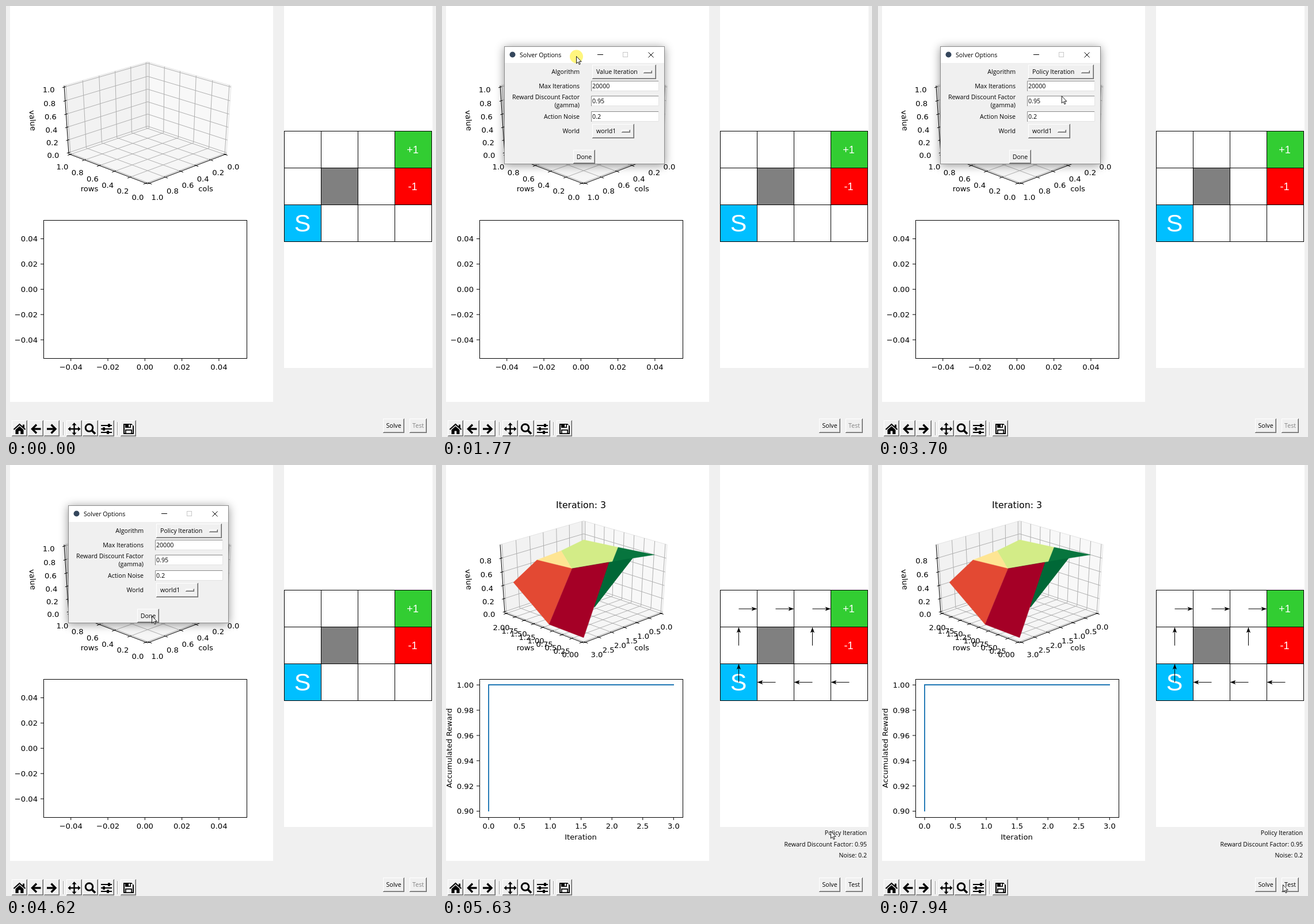
Animation of 747 by 749 pixels, one loop 8000 ms. Source, as an HTML page with a canvas:

```html
<!DOCTYPE html>
<html lang="en">
<head>
<meta charset="utf-8">
<title>Grid world solver</title>
<style>
html, body { margin: 0; width: 100%; height: 100%; overflow: hidden; background: #f0f0f0; }
canvas { display: block; }
</style>
</head>
<body>
<canvas id="stage" width="747" height="749"></canvas>
<script>
const g = document.getElementById('stage').getContext('2d');
const LOOP = 8000;
const PLOT = '"DejaVu Sans", sans-serif', UI = '"Open Sans", sans-serif', CELL = '"Liberation Sans", sans-serif';

// ---------- helpers ----------
function rect(x, y, w, h, fill) { g.fillStyle = fill; g.fillRect(x, y, w, h); }
function frame(x, y, w, h, color) {
  g.strokeStyle = color; g.lineWidth = 1; g.strokeRect(x + .5, y + .5, w - 1, h - 1);
}
function path(pts, close) {
  g.beginPath();
  pts.forEach((p, i) => i ? g.lineTo(p[0], p[1]) : g.moveTo(p[0], p[1]));
  if (close) g.closePath();
}
function line(pts, color = '#000', width = 1) {
  path(pts); g.strokeStyle = color; g.lineWidth = width; g.stroke();
}
function poly(pts, color) { path(pts, true); g.fillStyle = color; g.fill(); }
function disc(x, y, r, color) {
  g.beginPath(); g.arc(x, y, r, 0, 7); g.fillStyle = color; g.fill();
}
function text(s, x, y, { size = 10.6, font = UI, align = 'left', color = '#000' } = {}) {
  g.font = size + 'px ' + font; g.textAlign = align; g.fillStyle = color;
  g.fillText(s, x, y + size * .36);
}
function label(s, x, y, align = 'center', size = 13.1) { text(s, x, y, { size, font: PLOT, align }); }
function turned(s, x, y, deg) {
  g.save(); g.translate(x, y); g.rotate(deg * Math.PI / 180); label(s, 0, 0); g.restore();
}
const num = (v, d) => v.toFixed(d).replace('-', '\u2212');
const range = n => Array.from({ length: n }, (_, i) => i);

function raised(x, y, w, h) {
  rect(x, y, w, h, '#696969');
  rect(x, y, w - 1, h - 1, '#fff');
  rect(x + 1, y + 1, w - 2, h - 2, '#a0a0a0');
  rect(x + 1, y + 1, w - 3, h - 3, '#f0f0f0');
}
function button(s, x, y, w, h, on = true) {
  raised(x, y, w, h);
  text(s, x + w / 2, y + h / 2, { align: 'center', color: on ? '#000' : '#838383' });
}
function option(s, x, y, w) {
  raised(x, y, w, 25);
  text(s, x + 7, y + 12);
  raised(x + w - 22, y + 10, 15, 5);
}
function entry(s, y) {
  rect(259, y, 118, 18, '#fff');
  line([[259.5, y + 18], [259.5, y + .5], [377, y + .5]], '#8a8a8a');
  line([[260, y + 17.5], [376.5, y + 17.5], [376.5, y]], '#e3e3e3');
  text(s, 261, y + 9);
}
function panel(x, y, w, h, fill) {
  g.save();
  g.shadowColor = 'rgba(0,0,0,.42)'; g.shadowBlur = 15; g.shadowOffsetY = 2;
  rect(x, y, w, h, fill);
  g.restore();
  frame(x, y, w, h, '#8b8b8b');
}
function cross(x, y) {
  line([[x - 4.5, y - 4.5], [x + 4.5, y + 4.5]]);
  line([[x + 4.5, y - 4.5], [x - 4.5, y + 4.5]]);
}

// ---------- 3D plot ----------
// a runs from the back corner to the right, b to the left, z up; all 0..1
function project(a, b, z) {
  const d = a + b, w = 1 - .0577 * d - .052 * z;
  return [246 + 129.1 * (a - b) / w, (211 + 31.2 * d - 119 * z) / w];
}
const pad = u => (u + 1 / 48) / (1 + 1 / 24);
const mix = (p, q, u) => [p[0] + (q[0] - p[0]) * u, p[1] + (q[1] - p[1]) * u];

// rows / cols: tick count, step, digits, first and last label place
// z: tick count, first tick in steps of 0.2, height of first tick, height per tick
const emptyAxes = {
  rows: [6, .2, 1, [229, 332], [98, 279]], cols: [6, .2, 1, [395, 279], [263, 332]], z: [6, 0, .02, .192]
};
const rows = [9, .25, 2, [223, 329], [103, 282]], cols = [7, .5, 1, [390, 281], [269, 329]];
const firstAxes = { rows, cols, z: [7, -4, .071, .135] };
const lastAxes = { rows, cols, z: [5, 0, .02, .1975] };

const firstSurface = {
  pts: [246,134, 206,149, 165,157, 127,254, 307,152, 265,178, 225,165, 184,205, 369,170, 331,176, 289,169, 246,229],
  fill: ['#ebf5a3', '#b9e176', '#b9e176', '#a50026', '#006837', '#60ba62']
};
const lastSurface = {
  pts: [246,130, 207,149, 165,165, 124,204, 306,143, 265,247, 226,180, 186,277, 369,156, 331,162, 290,169, 246,300],
  fill: ['#d3ec87', '#fee593', '#07753e', '#e34933', '#006837', '#a50026']
};

function cube(axes) {
  const P = project, grid = '#b0b0b0';
  poly([P(0,1,1), P(0,0,1), P(0,0,0), P(0,1,0)], '#f2f2f2');
  poly([P(1,0,1), P(0,0,1), P(0,0,0), P(1,0,0)], '#f8f8f8');
  poly([P(0,1,0), P(0,0,0), P(1,0,0), P(1,1,0)], '#f6f6f6');
  line([P(0,1,1), P(0,0,1), P(1,0,1), P(1,0,0)], '#e4e4e4');
  line([P(0,0,1), P(0,0,0)], '#dcdcdc');

  const [rn, rs, rd, r0, r1] = axes.rows, [cn, cs, cd, c0, c1] = axes.cols, [zn, zi, z0, dz] = axes.z;
  const ra = range(rn).map(i => 1 - pad(i / (rn - 1)));
  const cb = range(cn).map(i => pad(i / (cn - 1)));
  const zs = range(zn).map(i => z0 + i * dz);
  ra.forEach(a => line([P(a,1,0), P(a,0,0), P(a,0,1)], grid));
  cb.forEach(b => line([P(1,b,0), P(0,b,0), P(0,b,1)], grid));
  zs.forEach(z => line([P(0,1,z), P(0,0,z), P(1,0,z)], grid));

  line([P(0,1,1), P(0,1,0), P(1,1,0), P(1,0,0)]);
  ra.forEach((a, i) => {
    line([P(a,.985,0), P(a,1.03,0)]);
    label(num(i * rs, rd), ...mix(r0, r1, i / (rn - 1)));
  });
  cb.forEach((b, i) => {
    line([P(.985,b,0), P(1.03,b,0)]);
    label(num(i * cs, cd), ...mix(c0, c1, i / (cn - 1)));
  });
  zs.forEach((z, i) => {
    const [x, y] = P(0, 1, z);
    line([[x - 3, y + 1], [x + 2.5, y - .7]]);
    label(num((zi + i) * .2, 1), x - 27, y + 4.5);
  });
  label('rows', 145, 317);
  label('cols', 347, 317);
  turned('value', 46.5, 199, 86);
}
function surface({ pts, fill }) {
  const at = i => [pts[2 * i], pts[2 * i + 1]];
  [0, 1, 4, 2, 5, 6].forEach((q, i) => {
    const quad = [q, q + 1, q + 5, q + 4].map(at);
    poly(quad, fill[i]);
    path(quad, true); g.strokeStyle = fill[i]; g.lineWidth = .4; g.stroke();
  });
}

// ---------- reward plot ----------
function xTick(s, x) { line([[x, 612], [x, 617]]); label(s, x, 627.5); }
function rewardPlot(iter) {
  const started = iter >= 0;
  range(started ? 6 : 5).forEach(i => {
    const y = started ? 382.2 + 43.9 * i : 404.5 + 43.9 * i;
    line([[60, y], [65, y]]);
    label(started ? num(1 - .02 * i, 2) : num((2 - i) * .02, 2), 55, y, 'right');
  });
  if (iter < 1) {
    range(5).forEach(i => xTick(num((i - 2) * .02, 2), 112.7 + 64.3 * i));
  } else {
    const step = [.2, .25, .5][iter - 1], n = Math.round(iter / step);
    range(n + 1).forEach(i => xTick(num(i * step, iter === 2 ? 2 : 1), 81 + 321.3 * i / n));
  }
  if (started) {
    label('Iteration', 241, 646);
    turned('Accumulated Reward', 12.5, 492, -90);
    line(iter ? [[81, 602], [81, 382], [403, 382]] : [[241.5, 602], [241.5, 381]], '#1f77b4', 1.9);
  }
  frame(65, 372, 354, 241, '#000');
}

// ---------- grid world ----------
const turn = { r: 0, d: 90, l: 180, u: -90 };
function arrow(col, row, dir) {
  g.save();
  g.translate(515.5 + 64 * col, 250 + 63.8 * row);
  g.rotate(turn[dir] * Math.PI / 180);
  line([[0, 0], [25, 0]]);
  poly([[32, 0], [22, -3.6], [24.5, 0], [22, 3.6]], '#000');
  g.restore();
}
function world(policy) {
  const paint = (c, r, color) => rect(483 + 64 * c, 217 + 64 * r, 64, 64, color);
  paint(3, 0, '#32cd32'); paint(3, 1, '#f00'); paint(1, 1, '#808080'); paint(0, 2, '#00bfff');
  range(5).forEach(i => line([[483.5 + 64 * i, 217], [483.5 + 64 * i, 410]]));
  range(4).forEach(i => line([[483, 217.5 + 64 * i], [740, 217.5 + 64 * i]]));
  const white = { font: CELL, align: 'center', color: '#fff' };
  text('+1', 706.5, 250, { ...white, size: 18 });
  text('-1', 706.5, 314, { ...white, size: 18 });
  text('S', 515, 376.5, { ...white, size: 43 });
  [...policy].forEach((d, i) => { if (d in turn) arrow(i % 4, i >> 2, d); });
}

// ---------- toolbar ----------
function toolbar() {
  [10, 38, 66, 105, 133, 161, 199].forEach(x => raised(x, 720, 27, 28));
  [99, 193].forEach(x => { rect(x, 723, 1, 23, '#a0a0a0'); rect(x + 1, 723, 1, 23, '#fff'); });
  const y = 735;
  line([[13.5, 736], [23.5, 727], [33.5, 736]], '#000', 2.2);
  rect(29, 727.5, 3, 6, '#000');
  poly([[16.5, 736.5], [23.5, 730.3], [30.5, 736.5], [30.5, 744], [25.3, 744], [25.3, 738.5], [21.7, 738.5], [21.7, 744], [16.5, 744]], '#000');
  [[52, 1], [79.5, -1]].forEach(([x, s]) => {
    line([[x + 8.5 * s, y], [x - 6 * s, y]], '#000', 3.4);
    line([[x + s, y - 7.5], [x - 6.5 * s, y], [x + s, y + 7.5]], '#000', 3.4);
  });
  const cx = 118.5;
  line([[cx - 8, y], [cx + 8, y]], '#000', 2.4);
  line([[cx, y - 8], [cx, y + 8]], '#000', 2.4);
  range(4).forEach(i => {
    g.save(); g.translate(cx, y); g.rotate(i * Math.PI / 2);
    poly([[11, 0], [6.5, -4], [6.5, 4]], '#000');
    g.restore();
  });
  g.beginPath(); g.arc(144.5, 733, 6.3, 0, 7);
  g.strokeStyle = '#000'; g.lineWidth = 3; g.stroke();
  line([[149, 737.5], [155, 743.5]], '#000', 3.8);
  [[729, 179], [735, 170], [741, 177]].forEach(([ly, kx]) => {
    line([[165, ly], [184, ly]], '#000', 2);
    rect(kx - 2, ly - 2.8, 4, 5.6, '#000');
  });
  poly([[204, 726], [218, 726], [222, 730], [222, 744], [204, 744]], '#000');
  rect(206, 728, 14, 14, '#f0f0f0');
  rect(207, 726, 10, 7, '#000'); rect(213, 727.5, 2.5, 4, '#f0f0f0');
  rect(207, 736, 12, 8, '#000'); rect(208.7, 737.7, 8.6, 4.6, '#f0f0f0');
}

// ---------- windows ----------
function optionsWindow(dx, dy, algorithm, wide) {
  g.save(); g.translate(dx, dy);
  panel(108, 70, 279, 205, '#f0f0f0');
  rect(109, 71, 277, 28, '#fff');
  disc(122.5, 84.5, 5, '#34465c');
  text('Solver Options', 135, 85);
  line([[270, 84.5], [280, 84.5]]);
  frame(314, 80, 9, 9, '#c8c8c8');
  cross(363, 85);
  [['Algorithm', 114], ['Max Iterations', 139], ['Reward Discount Factor', 158.5], ['(gamma)', 172.5],
   ['Action Noise', 192], ['World', 217]].forEach(([s, y]) => text(s, 239, y, { align: 'right' }));
  option(algorithm, 261, 102, wide ? 114 : 111);
  entry('20000', 130); entry('0.95', 156); entry('0.2', 183);
  option('world1', 261, 205, 73);
  button('Done', 228, 250, 38, 24);
  g.restore();
}
function menu(hover) {
  rect(263, 131, 116, 61, 'rgba(0,0,0,.25)');
  rect(260, 128, 116, 60, '#f0f0f0');
  frame(260, 128, 116, 60, '#a0a0a0');
  ['Value Iteration', 'Policy Iteration', 'Q Learning'].forEach((s, i) => {
    if (i === hover) rect(263, 149, 110, 18, '#0078d7');
    text(s, 282, 140 + 18 * i, { color: i === hover ? '#fff' : '#000' });
  });
}
function messageBox(hover) {
  panel(324, 330, 193, 143, '#fff');
  rect(325, 433, 191, 39, '#f0f0f0');
  disc(339.5, 344, 5, '#34465c');
  cross(500, 345);
  disc(360, 396, 14.3, '#0078d7');
  rect(359, 392, 2.2, 12, '#fff'); disc(360.1, 388.4, 1.5, '#fff');
  text('Optimization is done.', 384, 397);
  rect(432, 444, 69, 19, hover ? '#e5f1fb' : '#e1e1e1');
  frame(432, 444, 69, 19, '#0078d7');
  if (!hover) frame(433, 445, 67, 17, '#0078d7');
  text('OK', 466.5, 453.5, { align: 'center' });
}

// ---------- pointer ----------
// start, last step, steps, then the corners of the way
const moves = [
  [70, 150, 2, [687, 734]],
  [300, 380, 2, [679, 734]],
  [610, 910, 5, [126, 63]],
  [1620, 1770, 3, [233, 87]],
  [1920, 2610, 10, [344, 159], [330, 118]],
  [2930, 3010, 2, [329, 126]],
  [3090, 3240, 3, [320, 157]],
  [3700, 3860, 3, [316, 154]],
  [4010, 4090, 2, [283, 217]],
  [4240, 4620, 6, [253, 262]],
  [4950, 5170, 4, [528, 438]],
  [5250, 5630, 6, [675, 636]],
  [6020, 6630, 9, [445, 447]],
  [7010, 7630, 9, [738, 712], [731, 722]],
  [7710, 7940, 4, [710, 734], [703, 729]]
];
const clicks = [[1620, 1920], [2860, 2930], [3550, 3630], [4870, 4950], [6860, 6940]];

function along(pts, u) {
  const len = pts.slice(1).map((p, i) => Math.hypot(p[0] - pts[i][0], p[1] - pts[i][1]));
  let rest = u * len.reduce((s, l) => s + l, 0);
  for (let i = 0; i < len.length; i++) {
    if (rest <= len[i]) return mix(pts[i], pts[i + 1], rest / len[i]);
    rest -= len[i];
  }
  return pts[pts.length - 1];
}
function pointerAt(t) {
  let pos = [694, 753];
  for (const [from, to, n, ...way] of moves) {
    if (t < from) break;
    const k = Math.min(n, 1 + Math.floor((t - from) / (to - from) * (n - 1) + .001));
    pos = along([pos, ...way], k / n);
  }
  return pos;
}
function pointer([x, y], pressed) {
  if (pressed) disc(x + .5, y + .8, 11.5, 'rgba(255,238,0,.5)');
  const shape = [[0, 0], [0, 12.4], [2.9, 9.8], [4.8, 14.2], [6.7, 13.4], [4.8, 9.2], [8.7, 9.2]];
  const pts = shape.map(p => [x + .5 + p[0], y + .5 + p[1]]);
  poly(pts, '#fff');
  path(pts, true); g.strokeStyle = '#000'; g.lineWidth = .9; g.stroke();
}

// ---------- scene ----------
function draw(t) {
  const during = (a, b) => t >= a && t < b;
  const iter = [5020, 5250, 5400, 5550].filter(s => t >= s).length - 1;
  const pos = pointerAt(t);

  rect(0, 0, 747, 749, '#f0f0f0');
  rect(7, 0, 457, 688, '#fff');
  rect(483, 0, 258, 629, '#fff');

  cube(iter < 0 ? emptyAxes : iter ? lastAxes : firstAxes);
  if (iter >= 0) {
    surface(iter ? lastSurface : firstSurface);
    label('Iteration: ' + iter, 241.5, 69, 'center', 15.7);
    ['Policy Iteration', 'Reward Discount Factor: 0.95', 'Noise: 0.2']
      .forEach((s, i) => text(s, 738, 639.5 + 19.5 * i, { align: 'right' }));
  }
  rewardPlot(iter);
  world(iter < 0 ? '' : iter ? 'rrr.u.u.ulll' : 'rrr.u.u.urul');
  toolbar();
  const done = t >= 5630;
  button('Solve', 655, 717, 37, 25, done || iter < 0);
  button('Test', 701, 717, 30, 25, done);

  if (during(760, 4950)) {
    const dx = t < 1770 ? Math.min(0, pos[0] - 233) : 0, dy = t < 1770 ? Math.min(0, pos[1] - 87) : 0;
    const opening = t < 1620, chosen = t >= 3630;
    optionsWindow(opening ? -107 : dx, opening ? -24 : dy, chosen ? 'Policy Iteration' : 'Value Iteration', chosen);
  }
  if (during(2930, 3630)) menu(t >= 3160 ? 1 : -1);
  if (during(5710, 6940)) messageBox(t >= 6550);
  pointer(pos, clicks.some(([a, b]) => during(a, b)));
}
function tick() {
  draw(performance.now() % LOOP);
  requestAnimationFrame(tick);
}
tick();
</script>
</body>
</html>
```
